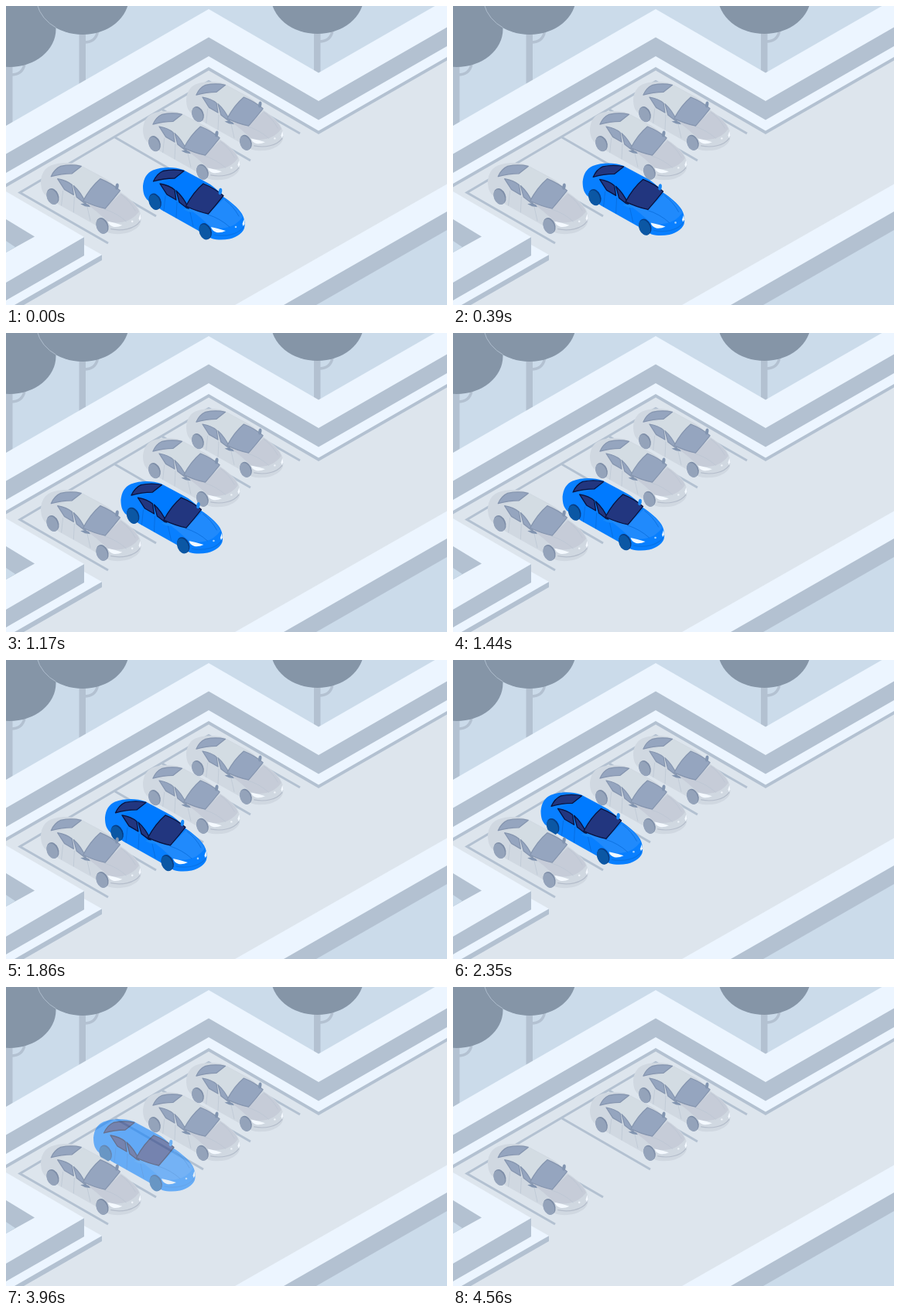
An HTML page with a canvas for the animation above (4.69 s loop, 570 px wide and 387 px high).

```html
<!DOCTYPE html>
<html lang="en">
<head>
<meta charset="utf-8">
<title>Parking</title>
<style>
html, body { margin: 0; width: 100%; height: 100%; overflow: hidden; background: #cbdbea; }
canvas { display: block; }
</style>
</head>
<body>
<canvas id="stage" width="570" height="387"></canvas>
<script>
const W = 570, H = 387, LOOP = 4690;
const ctx = document.getElementById('stage').getContext('2d');

const SKY = '#cbdbea', GROUND = '#dde5ed', WHITE = '#ecf5ff', SHADE = '#b3c1d1', LEAF = '#8595a7';

const BLUE = {
  body: '#087fff', roof: '#007aff', hood: '#208afc', glass: '#22367f', frame: '#08133f',
  wheel: '#0b57a4', arch: '#073c82', light: '#f0f8ff', seam: '#0668d6',
  mirror: '#1689fa', bumper: '#0873e6', badge: '#9fd0ff'
};
const GREY = {
  body: '#d0d8e1', roof: '#d3dce3', hood: '#c6ccd8', glass: '#95a5bf', frame: '#8595af',
  wheel: '#94a3ba', arch: '#7d8da7', light: '#f4f9ff', seam: '#bac5d2',
  mirror: '#8194b0', bumper: '#b4bdcb', badge: '#eef3f9'
};

const PARTS = {
  body: 'M0 24C1 14 5 7 13 3.5C25 -1 41 -1 52 3L80 18C90 23 98 30 104 38C113 44 123 52 128 60C131 65 132 71 131.5 76C131 84 122 90 112 92.5C104 94 96 94 89 92L72 82L24 55L7 43C2 39 0 33 0 24Z',
  roof: 'M22 20L42 14L54 5L80 19L56 50Q48 32 22 20Z',
  hood: 'M58 52L84 60L105 40C116 47 125 55 129 64Q120 76 107 78Q96 80 88 77Q74 64 58 52Z',
  rear: 'M13.5 18Q18 8 26 4.5Q40 1.5 53 4.5L41 14Q27 14 13.5 18Z',
  front: 'M55.5 50Q65 32 78 21Q93 27 104 36.5Q95 48 84.5 60Q70 57 55.5 50Z',
  sideA: 'M22 21Q34 23 41 29L43 42L31 35Z',
  sideB: 'M43 30Q53 39 59 53L60 55L47 45Z',
  seams: 'M29 37L27 56M44 45L43 65M61 58L65 76M84 61Q100 66 112 77M106 42Q117 50 124 63',
  bumper: 'M92 87C106 90 123 87 130 77',
  lampL: 'M88 77Q98 79 107 82Q101 85 95 84Q89 82 88 77Z',
  lampR: 'M128.5 73L130.5 67L131.5 73L129.5 76Z',
  mirror: 'M52 54Q58 52 63 55L65 58L58 57Z'
};
for (const k in PARTS) PARTS[k] = new Path2D(PARTS[k]);

function poly(g, color, ...pts) {
  g.fillStyle = color;
  g.beginPath();
  for (let i = 0; i < pts.length; i += 2) g.lineTo(pts[i], pts[i + 1]);
  g.closePath();
  g.fill();
}

function oval(g, color, x, y, rx, ry, turn = 0) {
  g.fillStyle = color;
  g.beginPath();
  g.ellipse(x, y, rx, ry, turn, 0, Math.PI * 2);
  g.fill();
}

function line(g, color, width, path) {
  g.strokeStyle = color;
  g.lineWidth = width;
  g.stroke(path);
}

function part(g, color, name) {
  g.fillStyle = color;
  g.fill(PARTS[name]);
}

function wheel(g, c, x, y) {
  oval(g, c.arch, x + 0.8, y - 1, 7.6, 10.8, -0.4);
  oval(g, c.wheel, x, y, 7, 10.3, -0.4);
}

function car(g, x, y, scale, c) {
  g.save();
  g.translate(x, y);
  g.scale(scale, scale);
  g.lineJoin = g.lineCap = 'round';
  part(g, c.body, 'body');
  part(g, c.roof, 'roof');
  part(g, c.hood, 'hood');
  line(g, c.seam, 0.7, PARTS.seams);
  line(g, c.bumper, 1.2, PARTS.bumper);
  for (const name of ['rear', 'sideA', 'sideB', 'front']) {
    part(g, c.glass, name);
    line(g, c.frame, 1.3, PARTS[name]);
  }
  wheel(g, c, 15, 45);
  wheel(g, c, 80, 83.5);
  part(g, c.light, 'lampL');
  part(g, c.light, 'lampR');
  part(g, c.mirror, 'mirror');
  oval(g, c.mirror, 100, 31, 2.2, 4.2, 0.15);
  oval(g, c.badge, 120, 77, 1.3, 1.3);
  g.restore();
}

// Bands following the bend of the back wall, each one lower than the last
function wallEdge(g, color, drop) {
  poly(g, color, 0, 155 + drop, 262, 4 + drop, 404, 86.5 + drop, W, -9 + drop, W, H, 0, H);
}

function tree(g, x, y, foot) {
  g.fillStyle = SHADE;
  g.fillRect(x - 4.5, y + 40, 8.5, foot - y - 40);
  line(g, SHADE, 3.5, new Path2D(`M${x + 2} ${y + 59}Q${x + 17} ${y + 59} ${x + 19.5} ${y + 45}`));
  oval(g, LEAF, x, y, 60, 49);
}

function scene(g) {
  g.fillStyle = SKY;
  g.fillRect(0, 0, W, H);
  tree(g, 4.5, 30, 160);
  tree(g, 99, -12, 104);
  tree(g, 402.5, -13, 92);
  g.save();
  g.beginPath();
  g.ellipse(4.5, 30, 60, 49, 0, 0, 7);
  g.clip();
  g.beginPath();
  g.ellipse(99, -12, 60, 49, 0, 0, 7);
  g.strokeStyle = '#b3c1d1';
  g.lineWidth = 0.9;
  g.stroke();
  g.restore();

  wallEdge(g, WHITE, 0);
  wallEdge(g, SHADE, 36.5);
  wallEdge(g, WHITE, 61);
  wallEdge(g, SHADE, 75);
  wallEdge(g, GROUND, 79.5);

  // Bay markings
  const marks = new Path2D('M132 307L18 241.5L262 97.5L380 165');
  for (let i = 1; i < 4; i++) {
    const x = 18 + 61 * i, y = 241.5 - 36 * i;
    marks.moveTo(x, y);
    marks.lineTo(x + 115, y + 66.5);
  }
  g.lineJoin = 'miter';
  g.lineCap = 'butt';
  line(g, SHADE, 3, marks);

  // Near right wall
  poly(g, WHITE, 296, H, W, 230.5, W, H);
  poly(g, SHADE, 359, H, W, 266, W, H);
  poly(g, SKY, 401, H, W, 290, W, H);

  // Near left wall
  poly(g, SHADE, 124, 322, 124, 329, 23, H, 0, H, 0, 381);
  poly(g, WHITE, 101, 309, 124, 322, 11, H, 0, H, 0, 381);
  poly(g, SHADE, 101, 299, 101, 323, 0, 381, 0, 357);
  poly(g, WHITE, 0, 240, 101, 299, 0, 358);
  poly(g, SHADE, 0, 276, 37, 298.5, 0, 319);
  poly(g, SKY, 0, 304, 12, 312, 0, 319);
}

function layer(draw) {
  const c = document.createElement('canvas');
  c.width = W;
  c.height = H;
  draw(c.getContext('2d'));
  return c;
}

const back = layer(g => {
  scene(g);
  car(g, 233, 98, 0.953, GREY);
  car(g, 177, 136, 0.953, GREY);
});
const near = layer(g => car(g, 45, 203, 0.985, GREY));
const mover = document.createElement('canvas');
mover.width = W;
mover.height = H;
const mg = mover.getContext('2d');

// Time and distance left to the bay
const ROUTE = [[0, 64], [540, 51], [840, 43.5], [1110, 37], [1620, 24], [1860, 15],
  [2175, 3.2], [2350, 0.5], [3010, 0]];

function distance(t) {
  for (let i = 1; i < ROUTE.length; i++) {
    const [t0, d0] = ROUTE[i - 1], [t1, d1] = ROUTE[i];
    if (t < t1) return d0 + (d1 - d0) * (t - t0) / (t1 - t0);
  }
  return 0;
}

function draw(t) {
  const d = distance(t);
  const alpha = Math.max(0, Math.min(1, 1 - (t - 3480) / 1080));
  ctx.drawImage(back, 0, 0);
  if (alpha > 0) {
    mg.clearRect(0, 0, W, H);
    car(mg, 113 + d, 171 + d * 0.594, 1, BLUE);
    ctx.globalAlpha = alpha;
    ctx.drawImage(mover, 0, 0);
    ctx.globalAlpha = 1;
  }
  ctx.drawImage(near, 0, 0);
}

const start = performance.now();
function tick() {
  draw((performance.now() - start) % LOOP);
  requestAnimationFrame(tick);
}
tick();
</script>
</body>
</html>
```
